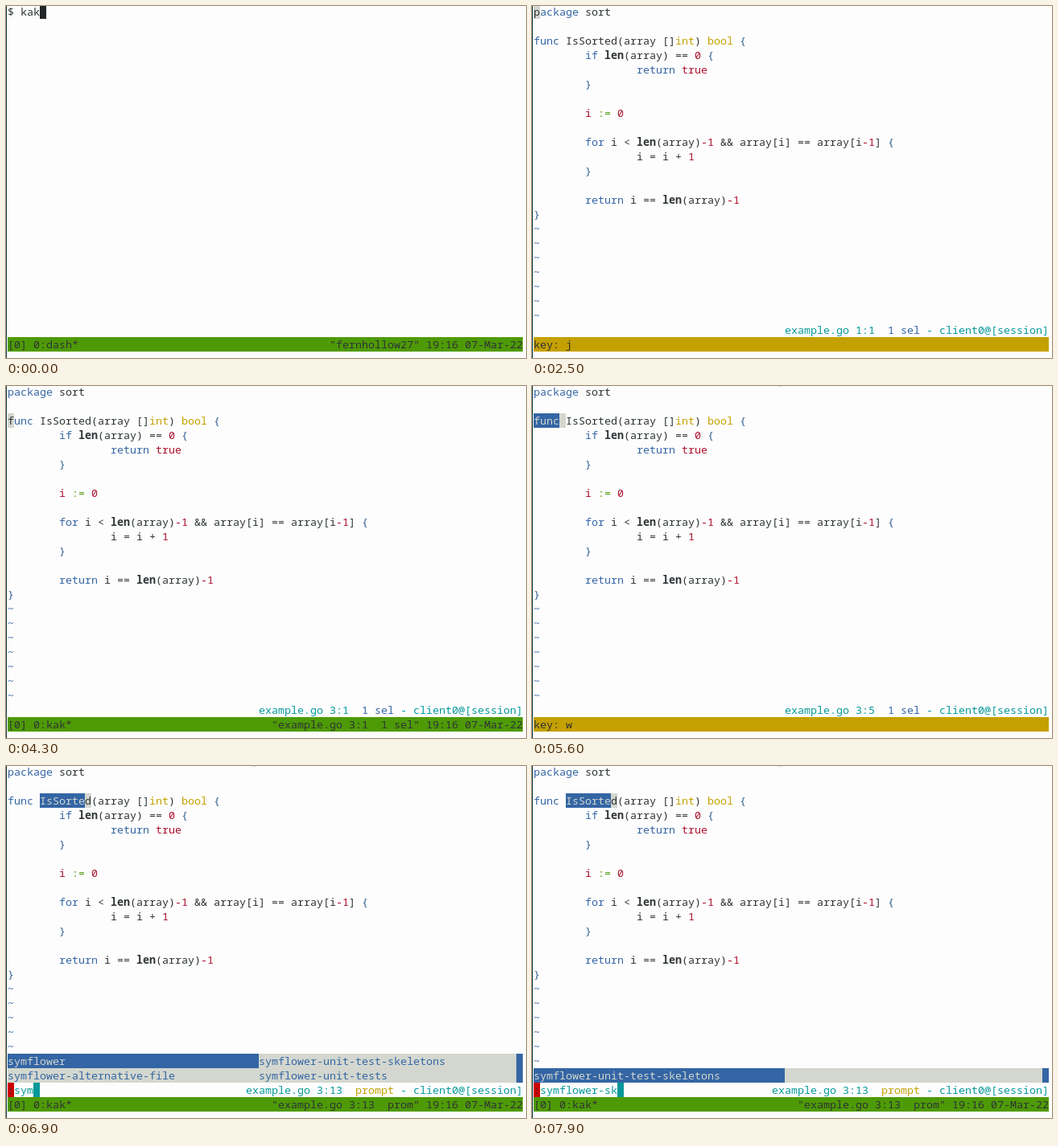
Recreate the animation shown at these times as an HTML page. Size 646x438 px, loop 8 s.

```html
<!DOCTYPE html>
<html lang="en">
<head>
<meta charset="utf-8">
<title>Terminal session</title>
<style>
html, body { margin: 0; width: 646px; height: 438px; overflow: hidden; background: #fdfdfd; }
#term {
  position: relative; width: 646px; height: 438px; overflow: hidden;
  box-sizing: border-box; border-left: 1px solid #0b3a44;
  font: calc(40px / 3)/18px "Noto Sans Mono", "DejaVu Sans Mono", monospace;
  font-variant-ligatures: none;
}
#term span { position: absolute; height: 18px; white-space: pre; }
#term i { position: absolute; left: 305px; top: 0; width: 5px; height: 1px; background: #dcdcdc; }
</style>
</head>
<body>
<div id="term"></div>
<script>
const LOOP = 8000, COLS = 80;
const FG = '#2e3436', BLUE = '#3465a4', CYAN = '#06989a', YELLOW = '#c4a000',
      GREEN = '#4e9a06', RED = '#cc0000', VALUE = '#ac0f2c', GREY = '#d3d7cf', BRACE = '#2f5f8f';
const term = document.getElementById('term');

const code = `package sort

func IsSorted(array []int) bool {
        if len(array) == 0 {
                return true
        }

        i := 0

        for i < len(array)-1 && array[i] == array[i-1] {
                i = i + 1
        }

        return i == len(array)-1
}`.split('\n');

// One capture group per style, in the order of tokenColors.
const token = /(\b(?:package|func|if|return|for)\b)|(\b(?:int|bool)\b)|(-?\b\d\b|\btrue\b|\bi(?= :=))|(:=)|([{}])|(\blen\b)/g;
const tokenColors = [BLUE, YELLOW, VALUE, GREEN, BRACE, FG];

function put(col, row, text, color = FG, bg = '', bold = false) {
  const s = document.createElement('span');
  s.textContent = text;
  s.style.cssText = `left:${1 + col * 8}px;top:${row * 18 - 2}px;width:${text.length * 8}px;` +
    `color:${color};background:${bg || 'none'};font-weight:${bold ? 700 : 400}`;
  term.append(s);
}

function putRight(row, parts) {
  let col = COLS - parts.reduce((n, [text]) => n + text.length, 0);
  for (const [text, color] of parts) {
    put(col, row, text, color);
    col += text.length;
  }
}

function statusBar(program, title) {
  put(0, 23, `[0] 0:${program}*`.padEnd(COLS), FG, GREEN);
  putRight(23, [[`"${title.slice(0, 21)}" 19:16 07-Mar-22`, FG]]);
}

function codeLine(line, row) {
  let end = 0;
  for (const m of line.matchAll(token)) {
    put(end, row, line.slice(end, m.index));
    const kind = m.slice(1).findIndex(Boolean);
    put(m.index, row, m[0], tokenColors[kind], '', kind === 5);
    end = m.index + m[0].length;
  }
  put(end, row, line.slice(end));
}

function select(row, from, to) {
  const text = code[row].padEnd(to + 1);
  put(from, row, text.slice(from, to), GREY, BLUE);
  put(to, row, text[to], FG, GREY);
}

function menu(items) {
  const rows = Math.ceil(items.length / 2), top = 22 - rows;
  for (let r = 0; r < rows; r++) {
    put(0, top + r, ''.padEnd(COLS - 1), FG, '#fdfdfd');
    [0, 1].forEach(c => {
      const n = c * rows + r, active = n === 0;
      put(c * 39, top + r, (items[n] || '').padEnd(c ? 40 : 39), active ? GREY : BLUE, active ? BLUE : GREY);
    });
    put(COLS - 1, top + r, ' ', FG, BLUE);
  }
}

function matches(input) {
  const [main, alt, skel, tests] = ['', '-alternative-file', '-unit-test-skeletons', '-unit-tests'].map(s => 'symflower' + s);
  if (input.endsWith('-sk')) return [skel];
  if (input.endsWith('-s')) return [skel, tests];
  if (input.endsWith('-')) return [alt, skel, tests];
  return [main, alt, skel, tests];
}

function shell(t) {
  const line = '$ kak example.go';
  put(0, 0, line.slice(0, 5 + Math.max(0, Math.floor(t / 100) - 1)));
  if (t >= 1300) put(0, 1, ' ', FG, '#232627');
  else put(Math.min(line.length, 5 + Math.max(0, Math.floor(t / 100) - 1)), 0, ' ', FG, '#232627');
  statusBar('dash', 'fernhollow27');
}

// [start, row, selection start, selection end]
const moves = [[1400, 0, 0, 0], [3300, 1, 0, 0], [4300, 2, 0, 0], [5300, 2, 0, 4], [6300, 2, 5, 12]];
// [start, end, key]
const keys = [[2500, 3300, 'j'], [3500, 4300, 'j'], [4500, 5300, 'w'], [5500, 6300, 'w']];

function typed(t) {
  if (t < 7100) return 'sym'.slice(0, Math.max(0, Math.floor((t - 6600) / 100)));
  if (t < 7200) return 'symf';
  if (t < 7400) return 'symflo';
  return 'symflower-sk'.slice(0, 7 + Math.floor((t - 7400) / 100));
}

function prompt(input) {
  const invalid = input && input !== 'symflower';
  if (input) menu(matches(input));
  put(0, 22, ':', invalid ? FG : YELLOW, invalid ? RED : '');
  put(1, 22, input, CYAN);
  put(1 + input.length, 22, ' ', FG, CYAN);
}

function editor(t) {
  code.forEach(codeLine);
  for (let row = code.length; row < 22; row++) put(0, row, '~', BLUE);
  const [, row, from, to] = moves.findLast(m => t >= m[0]);
  select(row, from, to);

  const prompting = t >= 6500;
  const place = `example.go ${row + 1}:${to + 1}  `;
  const mode = prompting ? 'prompt' : '1 sel';
  putRight(22, [[place, CYAN], [mode, prompting ? YELLOW : BLUE], [' - client0@[session]', CYAN]]);
  if (prompting) prompt(typed(t));

  const key = keys.find(k => t >= k[0] && t < k[1]);
  if (key) put(0, 23, `key: ${key[2]}`.padEnd(COLS), FG, YELLOW);
  else statusBar('kak', place + (t < 6600 ? '1 sel' : mode));
  if (t >= 5600) term.append(document.createElement('i'));
}

let shown = -1;
function frame() {
  const t = Math.floor(performance.now() % LOOP / 100) * 100;
  if (t !== shown) {
    shown = t;
    term.replaceChildren();
    (t < 1400 ? shell : editor)(t);
  }
  requestAnimationFrame(frame);
}
frame();
</script>
</body>
</html>
```
